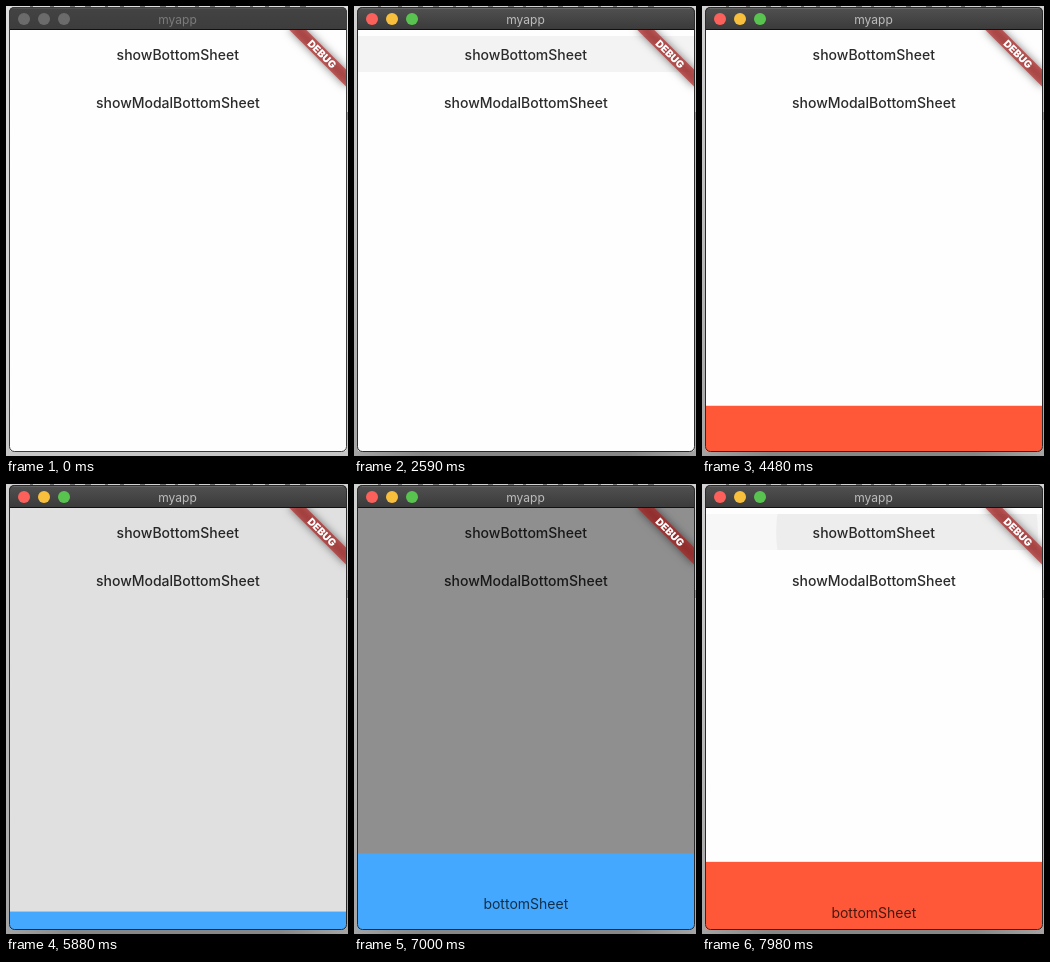
Write an HTML page with a canvas that moves like this. It is 342 px wide and 450 px high and loops after 8 s.

```html
<!DOCTYPE html>
<html lang="en">
<head>
<meta charset="utf-8">
<title>Bottom sheets</title>
<style>
  html, body { margin: 0; width: 100%; height: 100%; overflow: hidden; background: #ccc; }
  canvas { display: block; width: 342px; height: 450px; }
</style>
</head>
<body>
<canvas id="stage" width="342" height="450"></canvas>
<script>
const ctx = document.getElementById('stage').getContext('2d');
const LOOP = 8000;
const LEFT = 4, RIGHT = 340, TOP = 24, BOTTOM = 445, SHEET = 100;
const FONT = 'Inter, Roboto, sans-serif';
const ORANGE = '#ff5839', BLUE = '#44a8ff';

const clamp = v => Math.max(0, Math.min(1, v));
const span = (t, start, length) => clamp((t - start) / length);
const smooth = u => u * u * (3 - 2 * u);
const black = alpha => `rgba(0,0,0,${alpha})`;

// Opens with a short deceleration, closes by a downward drag.
const opened = (t, start) => 1 - Math.pow(1 - span(t, start, 250), 1.5);
const dragged = (t, start) => 1 - smooth(span(t, start, 660));

function rect(x, y, w, h, fill) {
  ctx.fillStyle = fill;
  ctx.fillRect(x, y, w, h);
}

function circle(x, y, r, fill) {
  ctx.fillStyle = fill;
  ctx.beginPath();
  ctx.arc(x, y, r, 0, Math.PI * 2);
  ctx.fill();
}

function label(text, x, y, size, weight, fill) {
  ctx.font = `${weight} ${size}px ${FONT}`;
  ctx.textAlign = 'center';
  ctx.textBaseline = 'alphabetic';
  ctx.fillStyle = fill;
  ctx.fillText(text, x, y);
}

function gradient(y0, y1, from, to) {
  const g = ctx.createLinearGradient(0, y0, 0, y1);
  g.addColorStop(0, from);
  g.addColorStop(1, to);
  return g;
}

function windowPath(inset) {
  ctx.beginPath();
  ctx.roundRect(3 + inset, 1 + inset, 338 - 2 * inset, 445 - 2 * inset, 5);
}

function desktop(active) {
  rect(0, 0, 342, 450, active ? gradient(0, 450, '#d2d2d2', '#a4a4a4')
                              : gradient(0, 450, '#dedede', '#c6c6c6'));
  if (active) {
    const g = ctx.createLinearGradient(0, 0, 342, 0);
    g.addColorStop(0, black(0));
    g.addColorStop(0.2, black(0.18));
    g.addColorStop(0.8, black(0.18));
    g.addColorStop(1, black(0));
    rect(0, 446, 342, 4, g);
  }
  for (let i = 0; i < 16; i++) {
    rect(24 + i * 18 + (i * 7) % 5, 0, 3 + (i * 5) % 4, 1, '#777');
  }
  rect(341, 106, 1, 8, '#66b39d');
}

function titleBar(active) {
  rect(3, 1, 338, 22, active ? gradient(2, 23, '#505050', '#3b3b3b')
                             : gradient(2, 23, '#434343', '#3d3d3d'));
  rect(4, 2, 336, 1, active ? '#666' : '#505050');
  rect(3, 23, 338, 1, '#111');
  const lights = active ? ['#fc605a', '#f8bf3c', '#58c44f'] : ['#6b6b6b', '#6b6b6b', '#6b6b6b'];
  lights.forEach((fill, i) => circle(18 + i * 20, 13, 6, fill));
  label('myapp', 171.5, 17.5, 12, 400, active ? '#bcbcbc' : '#7b7b7b');
}

function button(text, y, hover) {
  if (hover) rect(LEFT, y, RIGHT - LEFT, 36, black(0.043 * hover));
  label(text, 171.8, y + 23.7, 14, 500, '#2b2b2b');
}

function ripple(t, start) {
  const age = t - start;
  if (age < 0 || age > 400) return;
  ctx.save();
  ctx.beginPath();
  ctx.rect(LEFT, 30, RIGHT - LEFT, 36);
  ctx.clip();
  circle(205, 48, 130 * Math.min(1.4, age / 145), black(0.04 * (1 - span(age, 200, 200))));
  ctx.restore();
}

function sheet(amount, fill) {
  if (amount <= 0) return;
  const top = BOTTOM - SHEET * amount;
  rect(LEFT, top, RIGHT - LEFT, SHEET, fill);
  label('bottomSheet', 171.8, top + 56, 14, 400, black(0.72));
}

function banner() {
  ctx.save();
  ctx.translate(RIGHT, TOP);
  ctx.rotate(Math.PI / 4);
  ctx.save();
  ctx.shadowColor = black(0.5);
  ctx.shadowBlur = 8;
  // Only the shadow lands on stage; its caster is far to the left.
  ctx.shadowOffsetX = 1000;
  const away = -1000 * Math.SQRT1_2;
  ctx.translate(away, -away);
  rect(-40, 28, 80, 12, '#000');
  ctx.restore();
  rect(-40, 28, 80, 12, 'rgba(183,28,28,0.627)');
  label('DEBUG', 0, 37.7, 10.2, 900, '#fff');
  ctx.restore();
}

function draw(t) {
  const active = t >= 1540;
  const firstHover = t < 7000
    ? span(t, 2540, 50) * (1 - span(t, 3080, 100))
    : 0.68 * span(t, 7810, 30);
  const modalHover = span(t, 5700, 40) * (1 - span(t, 5811, 50));
  const persistent = t < 7000 ? opened(t, 2690) * dragged(t, 4130) : opened(t, 7850);
  const modal = opened(t, 5851) * dragged(t, 6790);

  ctx.clearRect(0, 0, 342, 450);
  desktop(active);
  ctx.save();
  windowPath(0);
  ctx.clip();
  titleBar(active);

  ctx.beginPath();
  ctx.rect(LEFT, TOP, RIGHT - LEFT, BOTTOM - TOP);
  ctx.clip();
  rect(LEFT, TOP, RIGHT - LEFT, BOTTOM - TOP, '#fefefe');
  button('showBottomSheet', 30, firstHover);
  ripple(t, 2660);
  ripple(t, 7835);
  button('showModalBottomSheet', 78, modalHover);
  sheet(persistent, ORANGE);
  if (modal > 0) {
    rect(LEFT, TOP, RIGHT - LEFT, BOTTOM - TOP, black(0.54 * modal * (1.3 - 0.3 * modal)));
  }
  sheet(modal, BLUE);
  banner();
  ctx.restore();

  windowPath(0.5);
  ctx.strokeStyle = active ? '#2a2a2a' : '#3c3c3c';
  ctx.lineWidth = 1;
  ctx.stroke();
}

function frame() {
  draw(performance.now() % LOOP);
  requestAnimationFrame(frame);
}
frame();
</script>
</body>
</html>
```
